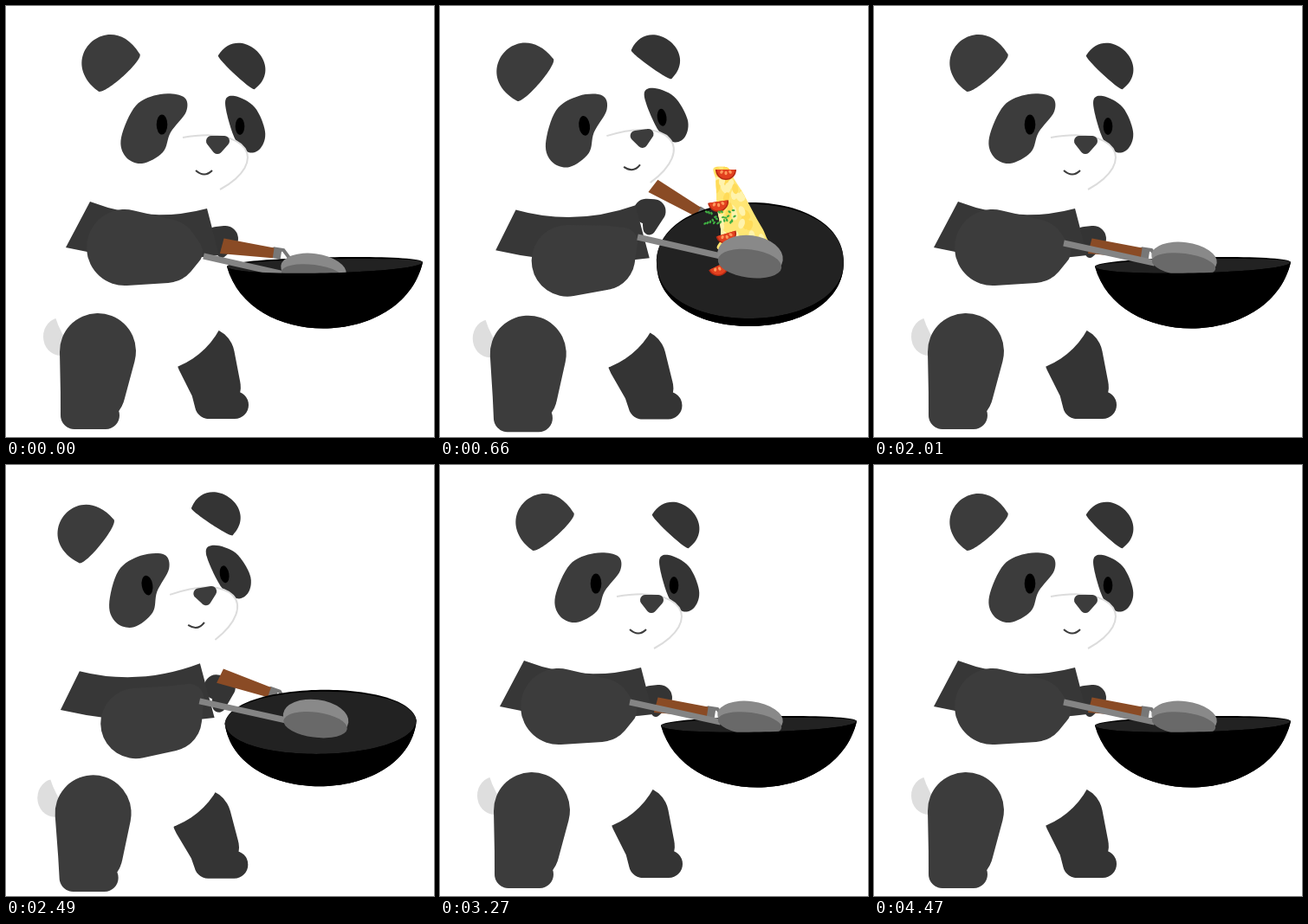
Recreate the animation shown at these times as an HTML page with a canvas. Size 494 by 498 pixels, loop 4530 ms.

```html
<!DOCTYPE html>
<html lang="en">
<head>
<meta charset="utf-8">
<title>Cooking panda</title>
<style>
  html, body { margin: 0; width: 100%; height: 100%; overflow: hidden; background: #fff; }
  canvas { display: block; width: 494px; height: 498px; }
</style>
</head>
<body>
<canvas id="stage" width="494" height="498"></canvas>
<script>
const ctx = document.getElementById('stage').getContext('2d');
const LOOP = 4530, TOSS = LOOP / 2, TAU = Math.PI * 2;
const DARK = '#3c3c3c', DEEP = '#343434', STEEL = '#848484';

const lerp = (a, b, k) => a + (b - a) * k;
const clamp = (v, a = 0, b = 1) => Math.min(b, Math.max(a, v));
const smooth = k => (1 - Math.cos(Math.PI * clamp(k))) / 2;
const ramp = (t, from, to) => smooth((t - from) / (to - from));

// Blend from rest towards the back (k < 0) or front (k > 0) pose.
function pose({ rest, back, front }, k) {
  const end = k < 0 ? back : front;
  return rest.map((v, i) => lerp(v, end[i], Math.abs(k)));
}

function random(seed) {
  return () => {
    seed = (seed * 16807) % 2147483647;
    return seed / 2147483647;
  };
}

function fill(color) {
  ctx.fillStyle = color;
  ctx.fill();
}

function stroke(color, width) {
  ctx.strokeStyle = color;
  ctx.lineWidth = width;
  ctx.stroke();
}

function oval(color, x, y, rx, ry = rx, turn = 0) {
  ctx.beginPath();
  ctx.ellipse(x, y, rx, ry, turn, 0, TAU);
  fill(color);
}

// Smooth closed curve through points.
function blob(color, pts) {
  const at = i => pts[(i + pts.length) % pts.length];
  ctx.beginPath();
  ctx.moveTo(...pts[0]);
  pts.forEach((b, i) => {
    const a = at(i - 1), c = at(i + 1), d = at(i + 2);
    ctx.bezierCurveTo(b[0] + (c[0] - a[0]) / 6, b[1] + (c[1] - a[1]) / 6,
      c[0] - (d[0] - b[0]) / 6, c[1] - (d[1] - b[1]) / 6, c[0], c[1]);
  });
  fill(color);
}

// Chain of circles (x, y, r) joined by tapered capsules.
function limb(color, list) {
  ctx.beginPath();
  for (let i = 0; i + 5 < list.length; i += 3) {
    const [x1, y1, r1, x2, y2, r2] = list.slice(i, i + 6);
    const a = Math.atan2(y2 - y1, x2 - x1);
    const off = Math.acos(clamp((r1 - r2) / Math.hypot(x2 - x1, y2 - y1), -1, 1));
    ctx.moveTo(x1 + r1 * Math.cos(a + off), y1 + r1 * Math.sin(a + off));
    ctx.arc(x1, y1, r1, a + off, a - off + TAU);
    ctx.arc(x2, y2, r2, a - off, a + off);
    ctx.closePath();
  }
  fill(color);
}

// Area between two arcs over one chord; a negative taper makes them rounder.
function lens(color, x1, y1, x2, y2, h1, h2, taper) {
  const len = Math.hypot(x2 - x1, y2 - y1);
  const ux = (x2 - x1) / len, uy = (y2 - y1) / len;
  const handle = (x, y, h, side) => {
    const along = side * taper * Math.abs(h), out = h * 4 / 3;
    return [x + ux * along - uy * out, y + uy * along + ux * out];
  };
  ctx.beginPath();
  ctx.moveTo(x1, y1);
  ctx.bezierCurveTo(...handle(x1, y1, h1, 1), ...handle(x2, y2, h1, -1), x2, y2);
  ctx.bezierCurveTo(...handle(x2, y2, h2, -1), ...handle(x1, y1, h2, 1), x1, y1);
  fill(color);
}

const rig = {
  // tail centre, centre of the back
  tail: { rest: [63, 382, 150, 332], back: [53, 386, 141, 336], front: [51, 349, 152, 331] },
  // hip, foot
  nearLeg: { rest: [106, 399, 97, 473], back: [98, 404, 95, 479], front: [84, 380, 78, 481] },
  farLeg: { rest: [230, 405, 249, 461], back: [224, 410, 248, 462], front: [212, 420, 252, 466] },
  // four corners
  chest: {
    rest: [97, 226, 232, 234, 246, 288, 69, 279],
    back: [79, 244, 220, 227, 238, 294, 60, 285],
    front: [109, 219, 261, 244, 260, 315, 115, 281]
  },
  // shoulder, elbow, hand
  nearArm: {
    rest: [137, 279, 44, 185, 283, 37, 210, 284, 17],
    back: [156, 308, 39, 190, 298, 38, 212, 263, 17],
    front: [113, 258, 36, 90, 300, 31, 98, 342, 24]
  },
  farArm: {
    rest: [244, 270, 15, 253, 269, 15, 249, 286, 5],
    back: [248, 276, 14, 256, 277, 13, 250, 300, 9],
    front: [265, 270, 23, 286, 271, 24, 257, 340, 6]
  },
  // centre, angle
  grip: { rest: [280, 281, 0.15], back: [300, 286, 0.15], front: [273, 223, 0.54] },
  // rim ends, height above, near edge of the opening, taper
  wok: {
    rest: [255, 301, 481, 296, 8, 10, 0.34],
    back: [254, 281, 482, 268, 52, -52, 0.5],
    front: [250, 297, 466, 295, 69, 65, 0]
  }
};

const leanAt = t =>
  t < 800 ? -1.42 * ramp(t, 0, 465) * (1 - ramp(t, 465, 800))
  : t < 1640 ? 1.13 * Math.sin(clamp((t - 1100) / 540) * Math.PI / 2)
  : 1.13 * (1 - ramp(t, 1640, 2000));

// The wok opens to the viewer, flips up, then catches and settles.
const tiltAt = t =>
  0.9 * ramp(t, 0, 430) - 1.9 * ramp(t, 430, 550) + 2 * ramp(t, 590, 655) - ramp(t, 720, 1000);

// 0 hidden in the wok, 1 standing in it, 2 in the air.
const foodAt = t =>
  ramp(t, 330, 430) + ramp(t, 430, 560) - ramp(t, 595, 660) - ramp(t, 660, 820);

function drawLeg(color, [hx, hy, fx, fy], r, span, pitch = 0) {
  const dx = span * Math.cos(pitch), dy = span * Math.sin(pitch);
  limb(color, [hx, hy, r, lerp(hx, fx, 0.63), lerp(hy, fy, 0.63), r * 0.85,
    fx - dx, fy - dy, 16, fx + dx, fy + dy, 16]);
}

function drawChest([ax, ay, bx, by, cx, cy, dx, dy]) {
  ctx.beginPath();
  ctx.moveTo(ax, ay);
  ctx.quadraticCurveTo((ax + bx) / 2, (ay + by) / 2 + 22, bx, by);
  ctx.lineTo(cx, cy);
  ctx.quadraticCurveTo((cx + dx) / 2, (cy + dy) / 2 + 16, dx, dy);
  fill('#373737');
}

function drawMuzzle(turn) {
  const x = 204 - 5 * turn, y = 152 - 5 * turn;
  ctx.beginPath();
  ctx.moveTo(x, y);
  ctx.bezierCurveTo(280 - 10 * turn, 138 - 2 * turn, 305 - 20 * turn, 180,
    247 - 11 * turn, 212 + 9 * turn);
  fill('#fff');
  stroke('#dcdcdc', 2);
  limb(DARK, [237, 156, 6, 252, 156, 6, 244, 165, 6, 237, 156, 6]);
  ctx.beginPath();
  ctx.moveTo(219, 190);
  ctx.quadraticCurveTo(229, 199, 238, 190);
  stroke(DARK, 2);
}

function drawHead(lean, turn) {
  ctx.save();
  if (lean < 0) {
    ctx.translate(184, 241);
    ctx.rotate(lean * 14 * Math.PI / 180);
    ctx.translate(-184, -241);
  } else {
    ctx.translate(20 * lean, 8 * lean);
  }
  lens(DARK, 106, 98, 154, 55, -47, 7, -0.25);
  lens(DEEP, 245 + 21 * turn, 57 + 3 * turn, 287 + 22 * turn, 96 + 7 * turn,
    -34 - 12 * turn, 3, -0.25);

  blob(DARK, [[133, 152], [150, 115], [178, 102], [205, 105], [208, 122],
    [190, 146], [181, 169], [157, 182], [138, 174]]);
  ctx.save();
  ctx.translate(277, 137);
  ctx.scale(1 + 0.16 * turn, 1 + 0.16 * turn);
  blob(DEEP, [[-24, -25], [-13, -33], [10, -20], [22, 8], [17, 27], [3, 32], [-13, 16]]);
  ctx.restore();
  oval('#000', 180, 137, 6.3, 11.5);
  oval('#000', 270, 139, 5.3, 10);
  drawMuzzle(turn);
  ctx.restore();
}

function drawGrip([x, y, angle]) {
  ctx.save();
  ctx.translate(x, y);
  ctx.rotate(angle);
  ctx.beginPath();
  ctx.moveTo(28, -5);
  ctx.lineTo(40, -5);
  ctx.lineTo(50, 5);
  stroke('#777', 4);
  ctx.fillStyle = '#777';
  ctx.fillRect(26, -6, 12, 12);
  ctx.beginPath();
  ctx.moveTo(-30, -8);
  ctx.lineTo(29, -6);
  ctx.lineTo(29, 6);
  ctx.lineTo(-32, 10);
  fill('#8a4b25');
  ctx.restore();
}

function drawTomato(x, y, angle) {
  ctx.save();
  ctx.translate(x, y);
  ctx.rotate(angle);
  for (const [r, color] of [[12, '#b52a14'], [10.5, '#e2411f']]) {
    ctx.beginPath();
    ctx.arc(0, 0, r, 0, Math.PI);
    fill(color);
  }
  for (const d of [-5, 0, 5]) oval('#ff9a5c', d, 4 - Math.abs(d) / 4, 1.6, 2.2, -d / 8);
  ctx.restore();
}

function drawFood(level) {
  if (level < 0.04) return;
  const fly = clamp(level - 1), rnd = random(90731);
  // Point at height u (0 top, 1 bottom), w from -1 (left edge) to 1 (right edge).
  const spot = (u, w) => [
    lerp(324 + 32 * u, 382 + 34 * (1 - (1 - u) ** 2), fly)
      + w * lerp(8 + 23 * u, 8 + 17 * smooth(u / 0.75), fly),
    lerp(187 + 95 * u, 21 + 159 * u, fly)
  ];
  ctx.save();
  ctx.translate(0, 300);
  ctx.scale(1, clamp(level));
  ctx.translate(0, -300);

  const edge = [];
  for (let i = 0; i < 18; i++) {
    const u = i < 9 ? i / 8 : (17 - i) / 8;
    edge.push(spot(u, (i < 9 ? 1 : -1) * (0.92 + 0.16 * rnd())));
  }
  ctx.save();
  blob('#ffe674', edge);
  ctx.clip();
  for (let i = 0; i < 44; i++) {
    const [x, y] = spot(rnd(), rnd() * 2 - 1);
    oval(i % 2 ? '#fff3ac' : '#ffdb58', x, y, 3.5, lerp(6, 9, fly), rnd() - 0.6);
  }
  ctx.restore();

  const air = [[402, 66, -0.7], [388, 84, 0.1], [427, 113, -0.2], [451, 195, 0]];
  air.forEach(([x, y, angle], i) =>
    drawTomato(lerp(330 - 9 * (i % 2), x, fly), lerp(189 + 37 * i, y, fly), lerp(-0.15 * i, angle, fly)));

  for (let i = 0; i < 24; i++) {
    const u = i / 23, w = rnd(), high = i % 4 === 0;
    const x = lerp(306 + 34 * u, high ? 386 + 24 * u : 355 + 85 * u, fly);
    const y = lerp(236 + 16 * w, high ? 42 + 10 * w : 82 + 13 * w, fly);
    oval('#3fae42', x, y, 1.9, 1.2, w * 6);
  }
  ctx.restore();
}

function drawSpoon(t, tilt, turn) {
  const toward = Math.max(tilt, 0), away = Math.max(-tilt, 0);
  const dip = 1 - ramp(t, 0, 300);
  const hx = 219 + 9 * Math.max(Math.abs(tilt), dip) - 6 * turn;
  const hy = 274 - 7 * toward - 18 * away + 4 * turn + 15 * dip;
  const bx = 358 - 3 * dip - 13 * away, by = 292 - 3 * toward - 10 * away + 13 * dip;
  const ry = 19 + 5 * toward;
  ctx.lineJoin = 'round';
  ctx.beginPath();
  ctx.moveTo(hx + 2 * turn, hy + 5 * turn);
  ctx.lineTo(hx + 4 * turn, hy - turn);
  ctx.lineTo(bx - 34, by + 5 - 5 * toward);
  stroke(STEEL, 7);
  oval('#898989', bx, by, 38, ry, 0.13);
  oval('#696969', bx - 0.5, by + ry * 0.36, 37, ry * 0.68, 0.13);
}

function draw(t) {
  const lean = leanAt(t), tilt = tiltAt(t);
  const turn = smooth(lean / 0.65);
  const swing = lean < 0 ? lean : turn;
  const lift = Math.max(tilt, 0);
  const [lx, ly, rx, ry, up, near, taper] = pose(rig.wok, tilt);
  const [tx, ty, backX, backY] = pose(rig.tail, lean);

  ctx.fillStyle = '#fff';
  ctx.fillRect(0, 0, 494, 498);

  oval('#dedede', tx, ty, 20, 22);
  drawLeg(DEEP, pose(rig.farLeg, lean), 34, 15, -0.3 * turn);
  oval('#fff', backX, backY, 97);
  oval('#fff', 163 + 7 * Math.max(lean, 0) + 3 * Math.min(lean, 0), 329, 94.5);

  ctx.save();
  ctx.translate(-8 * lift, -36 * lift);
  limb(DEEP, pose(rig.farArm, swing));
  ctx.restore();
  drawGrip(pose(rig.grip, tilt));
  drawChest(pose(rig.chest, lean));
  drawLeg(DARK, pose(rig.nearLeg, swing), 44, 18);
  limb(DARK, pose(rig.nearArm, swing));
  drawHead(lean, turn);

  const layer = (color, top, bottom) => lens(color, lx, ly, rx, ry, top, bottom, taper);
  layer('#000', -up, 74);
  if (near > -up) layer('#222', 2 - up, near);
  drawFood(foodAt(t));
  drawSpoon(t, tilt, turn);
  layer('#000', near, 74);
}

function frame(now) {
  draw(Math.floor((now % LOOP) / 30) * 30 % TOSS);
  requestAnimationFrame(frame);
}
requestAnimationFrame(frame);
</script>
</body>
</html>
```
